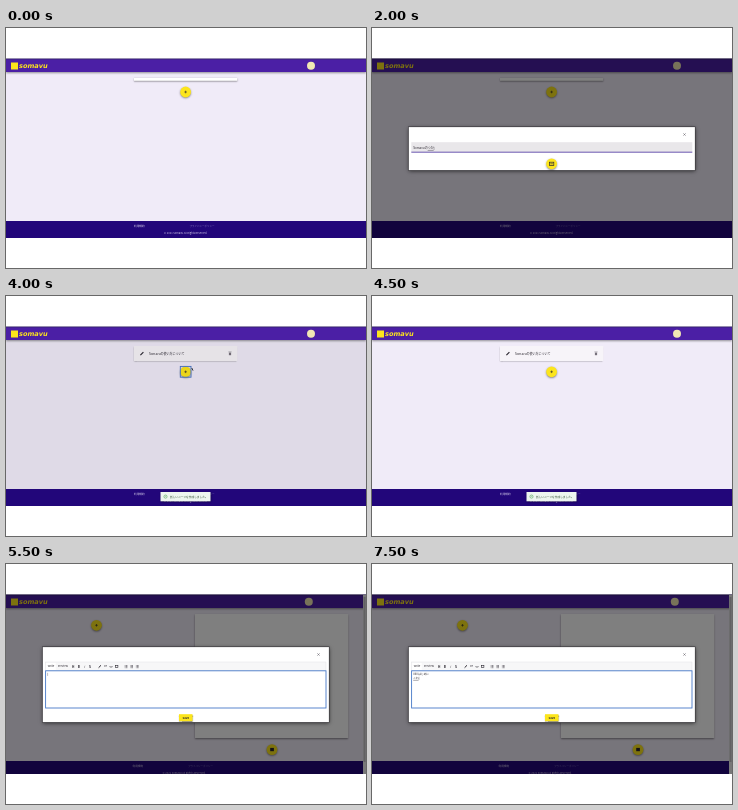
Write an HTML page with a canvas that moves like this. It is 360 px wide and 240 px high and loops after 8 s.

```html
<!DOCTYPE html>
<html lang="ja">
<head>
<meta charset="utf-8">
<title>Somavu</title>
<style>
html, body { margin: 0; width: 100%; height: 100%; overflow: hidden; background: #fff; }
canvas { display: block; width: 360px; height: 240px; }
</style>
</head>
<body>
<canvas id="stage"></canvas>
<script>
const LOOP = 8000, STEP = 500;
const SANS = '"Noto Sans CJK JP", "Noto Sans CJK", "Noto Sans", sans-serif';
const YELLOW = '#fce51c', INK = '#29252e', PAGE = '#f0ebf8';
const canvas = document.getElementById('stage');
const scale = window.devicePixelRatio || 1;
canvas.width = 360 * scale;
canvas.height = 240 * scale;
const ctx = canvas.getContext('2d');

// Committed text and the underlined part still being composed
const titles = [
  ['', ''], ['Somavu', ''], ['Somavuの', ''], ['Somavuの', 'つか'],
  ['Somavuの使い方', ''], ['Somavuの使い方について', '']
];
const notes = [
  [['', '']],
  [['###', '']],
  [['### ', 'はじ']],
  [['### はじめに', '']],
  [['### はじめに', ''], ['', 'これ']]
];

function rect(x, y, w, h, color) {
  ctx.fillStyle = color;
  ctx.fillRect(x, y, w, h);
}

function disc(x, y, r, color) {
  ctx.fillStyle = color;
  ctx.beginPath();
  ctx.arc(x, y, r, 0, Math.PI * 2);
  ctx.fill();
}

function line(x1, y1, x2, y2, color = INK, width = 0.6) {
  ctx.strokeStyle = color;
  ctx.lineWidth = width;
  ctx.beginPath();
  ctx.moveTo(x1, y1);
  ctx.lineTo(x2, y2);
  ctx.stroke();
}

function frame(x, y, w, h, color, width = 0.8) {
  ctx.strokeStyle = color;
  ctx.lineWidth = width;
  ctx.strokeRect(x, y, w, h);
}

function text(str, x, y, size, color = INK, align = 'left', font = SANS, style = '') {
  ctx.font = `${style} ${size}px ${font}`;
  ctx.textAlign = align;
  ctx.fillStyle = color;
  ctx.fillText(str, x, y);
  return ctx.measureText(str).width;
}

function shadowed(draw, blur = 2, dy = 0.8, alpha = 0.45) {
  ctx.save();
  ctx.shadowColor = `rgba(0,0,0,${alpha})`;
  ctx.shadowBlur = blur * scale;
  ctx.shadowOffsetY = dy * scale;
  draw();
  ctx.restore();
}

function roundButton(x, y, color = YELLOW) {
  shadowed(() => disc(x, y, 5.4, color));
}

function plus(x, y) {
  line(x - 1.3, y, x + 1.3, y);
  line(x, y - 1.3, x, y + 1.3);
}

function cross(x, y) {
  line(x - 1.2, y - 1.2, x + 1.2, y + 1.2, '#55505a', 0.5);
  line(x - 1.2, y + 1.2, x + 1.2, y - 1.2, '#55505a', 0.5);
}

function header(avatarX) {
  shadowed(() => rect(0, 31, 360, 13, '#4b1fa5'), 2, 0.6, 0.4);
  rect(0, 30.5, 360, 0.9, '#34236a');
  rect(5, 34.5, 7, 7, YELLOW);
  text('somavu', 13, 40.4, 6.6, YELLOW, 'left', '"DejaVu Sans", sans-serif', 'italic bold');
  disc(avatarX, 37.8, 4, '#f1e8b4');
}

function footer(top, shift) {
  rect(0, top, 360, 210 - top, '#22067a');
  text('利用規約', 128 + shift, top + 6, 2.7, '#e6e0f4');
  text('プライバシーポリシー', 183.5 + shift, top + 6, 2.5, '#8578bd');
  text('© 2021 Somavu All Rights Reserved.', 179.7 + shift, top + 12.8, 2.6, '#d5cdea', 'center');
}

function toast(shift) {
  shadowed(() => rect(154.5 + shift, 196, 50, 9.3, '#edf6ef'));
  ctx.strokeStyle = '#54a45b';
  ctx.lineWidth = 0.6;
  ctx.beginPath();
  ctx.arc(159.5 + shift, 200.6, 1.6, 0, Math.PI * 2);
  ctx.stroke();
  line(158.8 + shift, 200.6, 160.4 + shift, 200, '#54a45b', 0.5);
  text('新しいページを作成しました。', 164 + shift, 201.7, 2.7, '#27472b');
}

function listPage(hasItem) {
  rect(0, 31, 360, 179, PAGE);
  header(305);
  footer(193, 0);
  const y = hasItem ? 75.8 : 64;
  shadowed(() => rect(128, 50, 103.3, hasItem ? 15 : 2.8, hasItem ? '#f7f4f9' : '#fff'), 1.5, 0.6);
  if (hasItem) {
    line(134.4, 59.1, 137.4, 56.1, INK, 1.1);
    text('Somavuの使い方について', 143, 58.7, 3, INK);
    rect(222.9, 56.6, 2.2, 2.6, '#77717c');
    line(222.4, 55.9, 225.6, 55.9, '#77717c', 0.5);
  }
  roundButton(179.6, y);
  plus(179.6, y);
  return y;
}

function notePage(hover) {
  rect(0, 31, 360, 179, PAGE);
  header(302.8);
  footer(197, -1.5);
  shadowed(() => rect(189, 50, 153.3, 124, '#fff'), 1.8, 0.6);
  roundButton(90.5, 61.3, hover ? '#b56b3a' : YELLOW);
  plus(90.5, 61.3);
  roundButton(266, 185.6);
  rect(264.2, 183.9, 3.7, 3.3, INK);
  rect(357, 31, 3, 179, '#f1f1f1');
  rect(357.5, 33, 2, 165, '#c4c2c6');
}

function dim(alpha) {
  rect(0, 30.5, 360, 179.5, `rgba(0,0,0,${alpha})`);
}

function modal(y, h) {
  dim(0.5);
  shadowed(() => rect(36.5, y, 286.5, h, '#fff'), 4, 1, 0.7);
  frame(36.3, y - 0.2, 286.9, h + 0.4, '#38363b', 0.6);
  cross(312.5, y + 7.5);
}

function typed([done, draft], x, y, size, caret) {
  let end = x + text(done, x, y, size);
  if (draft) {
    const w = text(draft, end, y, size);
    line(end, y + 1, end + w, y + 1, INK, 0.4);
    end += w;
  }
  if (caret) line(end + 0.4, y - 2.5, end + 0.4, y + 0.6, INK, 0.3);
}

function titleModal(value) {
  modal(99, 43.3);
  rect(39.3, 114.2, 281, 9.8, '#e9e7ea');
  line(39.3, 124.2, 320.3, 124.2, '#5a43a6', 0.9);
  typed(value, 41.2, 121.4, 3, true);
  roundButton(179.6, 135.8);
  frame(177.4, 134.2, 4.4, 3.2, INK, 0.7);
  line(178.3, 135.8, 180.9, 135.8, INK, 0.6);
}

function toolbar() {
  rect(39.5, 98, 280.5, 8.5, '#f7f7f8');
  rect(40.2, 98.8, 9.5, 7.7, '#fff');
  frame(39.5, 98, 280.5, 8.5, '#dddce0', 0.4);
  text('Write', 41.7, 103.3, 2.7);
  text('Preview', 51.8, 103.3, 2.7);
  const marks = ['H', 'B', 'I', 'S'];
  marks.forEach((m, i) => text(m, 67.3 + i * 5.6, 103.6, 3.2, INK, 'center', SANS, m === 'I' ? 'italic' : 'bold'));
  line(92.6, 103.7, 95, 101.3, INK, 1);
  text('”', 99.4, 104.9, 5, INK, 'center', SANS, 'bold');
  text('<>', 105, 103.6, 3, INK, 'center', SANS, 'bold');
  frame(109.3, 101.4, 2.6, 2.2, INK, 0.6);
  for (let i = 0; i < 3; i++)
    for (let j = 0; j < 3; j++) {
      const x = 118.7 + i * 5.6, y = 101.4 + j * 1.1;
      rect(x, y, 0.5, 0.5, INK);
      rect(x + 0.9, y, 1.8, 0.5, INK);
    }
}

function noteModal(lines) {
  modal(83, 75.3);
  toolbar();
  rect(39.5, 106.7, 280.5, 37.3, '#fff');
  frame(39.6, 106.8, 280.4, 37.2, '#4779c7', 0.9);
  lines.forEach((l, i) => typed(l, 41.2, 111.3 + i * 4, 2.7, i === lines.length - 1));
  shadowed(() => rect(173, 150.2, 13.5, 7, YELLOW), 1, 0.4);
  text('SAVE', 179.8, 154.7, 2.7, INK, 'center', SANS, 'bold');
}

function focusRing(y, color) {
  frame(174.3, y - 5.4, 10.7, 10.8, color, 0.9);
}

function draw(step) {
  ctx.setTransform(scale, 0, 0, scale, 0, 0);
  rect(0, 0, 360, 240, '#fff');
  if (step < 8) {
    listPage(false);
    if (step > 0 && step < 7) titleModal(titles[step - 1]);
    if (step === 7) {
      rect(174.3, 58.6, 10.7, 10.8, 'rgba(240,216,24,0.55)');
      dim(0.5);
      focusRing(64, '#34323a');
      disc(182.6, 123, 0.7, '#dedbe2');
    }
  } else if (step < 10) {
    const y = listPage(true);
    if (step === 8) {
      rect(0, 44, 360, 149, 'rgba(0,0,0,0.07)');
      focusRing(y, '#416cb6');
      line(185.8, 72, 187, 74.6, '#222', 0.9);
    }
    toast(0);
  } else {
    notePage(step === 10);
    if (step === 10) toast(-1);
    else noteModal(notes[step - 11]);
  }
}

const start = performance.now();
function tick(now) {
  const t = Math.max(0, now - start) % LOOP;
  draw(Math.floor(t / STEP));
  requestAnimationFrame(tick);
}
draw(0);
requestAnimationFrame(tick);
</script>
</body>
</html>
```
